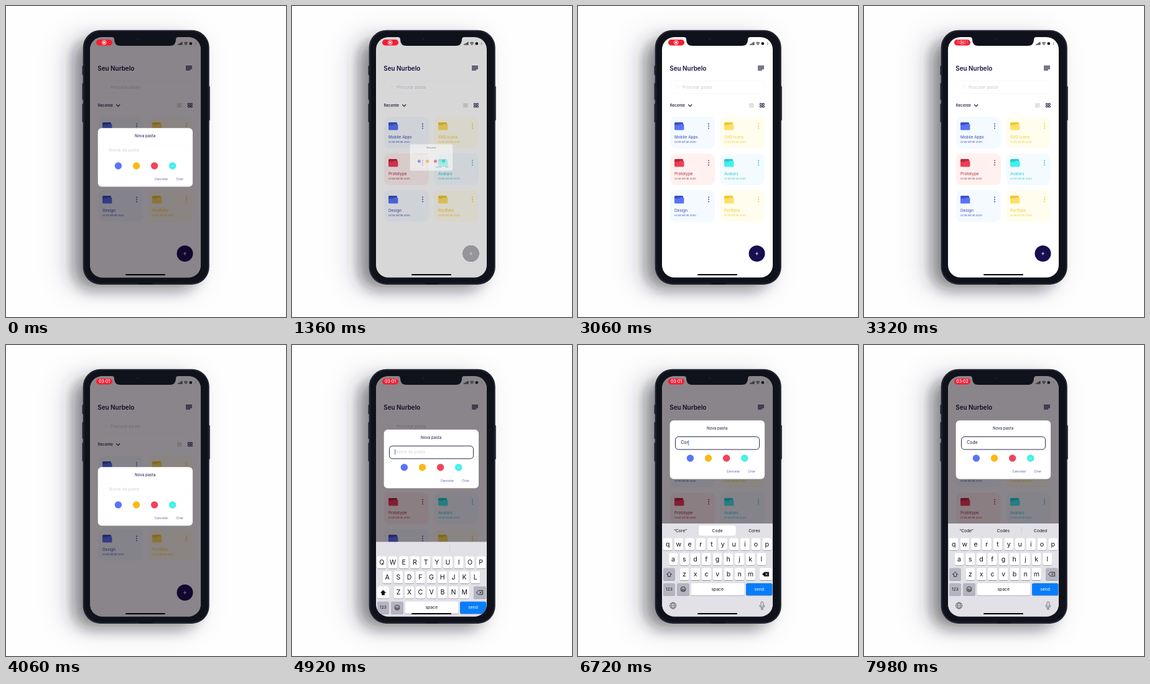
Recreate the animation shown at these times as an HTML page. Size 450 by 500 pixels, loop 8 s.

```html
<!DOCTYPE html>
<html lang="pt">
<head>
<meta charset="utf-8">
<title>Nova pasta</title>
<style>
  html, body { margin: 0; width: 100%; height: 100%; overflow: hidden; background: #fefefe; }
  svg { display: block; width: 100vw; height: 100vh; }
  text { font-family: Inter, "Open Sans", sans-serif; }
</style>
</head>
<body>
<svg id="stage" viewBox="0 0 450 500"></svg>
<script>
const LOOP = 8000, INK = '#14123f', KEY_GREY = '#b4b5c0';

// Markup helpers
const rect = (x, y, w, h, r, fill, more = '') =>
  `<rect x="${x}" y="${y}" width="${w}" height="${h}" rx="${r}" fill="${fill}" ${more}/>`;
const circle = (x, y, r, fill, more = '') => `<circle cx="${x}" cy="${y}" r="${r}" fill="${fill}" ${more}/>`;
const line = (d, color, width, more = '') =>
  `<path d="${d}" fill="none" stroke="${color}" stroke-width="${width}" stroke-linecap="round" stroke-linejoin="round" ${more}/>`;
const text = (x, y, size, fill, label, more = '') =>
  `<text x="${x}" y="${y}" font-size="${size}" fill="${fill}" ${more}>${label}</text>`;
const centered = (x, y, size, fill, label, more = '') =>
  text(x, y, size, fill, label, `text-anchor="middle" ${more}`);

const themes = {
  blue:   { card: '#f4faff', back: '#3f50bd', front: '#5873f8', title: '#3a48ad' },
  yellow: { card: '#fffdee', back: '#f3c62c', front: '#ffdf69', title: '#f5c81e' },
  red:    { card: '#fff1ef', back: '#b9283d', front: '#ee3c54', title: '#a32c40' },
  cyan:   { card: '#f3fbff', back: '#1fcfd0', front: '#40f0ec', title: '#2bc6d0' }
};

function card(name, theme, index) {
  const c = themes[theme];
  const dots = [11.5, 15, 18.5].map(y => circle(62, y, 0.95, c.title)).join('');
  return `<g transform="translate(${148 + index % 2 * 80} ${178 + Math.floor(index / 2) * 59})">
    ${rect(0, 0, 72, 51, 9, c.card)}
    <path d="M7 20V10.5q0-1.5 1.500-1.500h11q1.500 0 1.500 1.500V16z" fill="${c.back}"/>
    <path d="M7 13.500h7l2-1.500h5.200q1.200 0 1.200 1.200V20q0 1.500-1.500 1.500H8.500q-1.500 0-1.500-1.500z" fill="${c.front}"/>
    ${dots}
    ${text(7, 35.2, 6.4, c.title, name)}
    ${text(7, 42, 4, c.title, '03 de set de 2020')}
  </g>`;
}

function phoneBody() {
  return `<g filter="url(#wide)">${rect(92, 44, 222, 416, 34, '#33304a', 'opacity=".13"')}</g>
    <g filter="url(#near)">${rect(108, 54, 200, 402, 30, '#1b1b24', 'opacity=".45"')}</g>
    ${rect(122.6, 96, 3, 15, 1, '#171a24')}${rect(122.6, 124, 3, 27, 1, '#171a24')}
    ${rect(122.6, 157, 3, 30, 1, '#171a24')}${rect(324.5, 129, 3.200, 55, 1, '#171a24')}
    ${rect(123.700, 38.700, 203, 409.200, 28, '#20232e')}
    ${rect(126, 41, 198.500, 404.600, 26, '#0f121a')}
    ${rect(214, 445.800, 22, 1.500, .7, '#0a0d14')}`;
}

function appPage() {
  const menu = [10, 10, 10, 7].map((w, i) => rect(289, 96 + i * 2.1, w, 1.2, 0, INK)).join('');
  const list = [0, 1, 2].map(i => rect(275, 157 + i * 2.3, 7.5, 1, 0, '#b9bac6')).join('');
  const grid = [0, 1, 2, 3].map(i =>
    rect(292.4 + i % 2 * 4, 156.6 + (i >> 1) * 3.7, 2.9, 2.5, .4, 'none', `stroke="${INK}"`)).join('');
  const cards = [['Mobile Apps', 'blue'], ['SVG Icons', 'yellow'], ['Prototype', 'red'],
    ['Avatars', 'cyan'], ['Design', 'blue'], ['Portfolio', 'yellow']];
  return `${rect(135, 50, 178, 387, 0, '#fff')}
    ${text(147.3, 104, 9.9, INK, 'Seu Nurbelo', 'font-weight="600"')}${menu}
    ${rect(148, 120.5, 152, 20, 5, 'none', 'stroke="#f8f8fb" stroke-width=".8"')}
    ${circle(160, 130, 2.2, 'none', 'stroke="#efeff4" stroke-width=".8"')}
    ${text(168, 132.6, 6.75, '#c6c7d1', 'Procurar pasta')}
    ${text(147.8, 162.2, 6.2, INK, 'Recente', 'font-weight="500"')}
    ${line('M177.5 158.7l2.700 2.700 2.700-2.700', INK, 1.2)}${list}${grid}
    ${cards.map(([name, theme], i) => card(name, theme, i)).join('')}
    ${circle(287.5, 398, 13, '#160f50')}${circle(287.5, 398, 13, '#b1b1b5', 'id="fabPress"')}
    ${line('M285.4 398h4.200M287.500 395.900v4.200', '#fff', .8)}`;
}

function dialogBox() {
  const colors = ['#5a74f8', '#fdb813', '#f1435a', '#40f0ea'];
  return `<g id="dialog">
    ${rect(147.7, 196.3, 152.3, 94.2, 6, '#fff')}
    ${centered(223.6, 211.3, 6.2, INK, 'Nova pasta')}
    ${rect(156.5, 222.5, 135, 20.5, 5, '#fff', 'id="field" stroke-width=".9"')}
    ${text(165.5, 234.4, 6.75, '#d3d4dc', 'Nome da pasta', 'id="hint"')}
    ${text(165.3, 234.4, 6.9, INK, '', 'id="typed"')}
    ${rect(165, 228, .9, 8.5, .3, '#3b62ee', 'id="caret"')}
    ${colors.map((c, i) => circle(180.4 + i * 29.1, 257, 5.7, c)).join('')}
    ${line('M265.9 257.1l1.300 1.300 2.400-2.600', '#d4fffb', .7)}
    ${text(238.5, 280, 5.2, '#5a62a6', 'Cancelar')}${text(273.3, 280, 5.2, '#5a62a6', 'Criar')}
  </g>`;
}

function keyboard() {
  const STEP = 17.72;
  const key = (x, y, w, fill, more = '') =>
    rect(x, y + .8, w, 19.5, 2.6, '#97989f') + rect(x, y, w, 19.5, 2.6, fill, more);
  const row = (letters, firstX, y) => [...letters].map((letter, i) => {
    const x = firstX + i * STEP;
    return key(x - 7.5, y, 15, '#fff') + centered(x, y + 13.4, 10.6, '#111', letter, 'class="letter"');
  }).join('');
  return `<g id="keyboard">
    ${rect(135, 287, 178, 150, 0, '#e2e1e8')}
    ${rect(194, 290, 59.5, 16.5, 3.5, '#fff', 'id="pick"')}
    ${rect(253, 292, .6, 12, 0, '#c4c4cc', 'id="divider"')}
    ${[164.5, 224, 283.5].map(x => centered(x, 300.7, 6.7, '#111', '', 'class="word"')).join('')}
    ${row('qwertyuiop', 144.2, 310.4)}${row('asdfghjkl', 153.1, 334.4)}${row('zxcvbnm', 171, 358.6)}
    ${key(137, 358.6, 19, KEY_GREY, 'id="shift"')}
    <path id="arrow" d="M146.5 364.800l4 4h-2v3.600h-4v-3.600h-2z" stroke="#111" stroke-width=".8" stroke-linejoin="round"/>
    ${key(292, 358.6, 20, KEY_GREY, 'id="erase"')}
    <path id="eraseIcon" d="M296.5 368.500l3-3.200h7v6.400h-7z" stroke="#111" stroke-width=".8" stroke-linejoin="round"/>
    ${line('M301.5 367.100l2.800 2.800m0-2.800l-2.800 2.800', '#111', .8, 'id="eraseCross"')}
    ${key(137, 383, 19, KEY_GREY)}${centered(146.5, 395, 6.6, '#111', '123')}
    ${key(159, 383, 20, KEY_GREY)}${circle(169, 392.7, 4, 'none', 'stroke="#111" stroke-width=".8"')}
    ${circle(167.5, 391.6, .6, '#111')}${circle(170.5, 391.6, .6, '#111')}
    ${line('M166.6 393.900q2.400 2.700 4.800 0z', '#111', .7)}
    ${key(181.5, 383, 85.5, '#fff')}${centered(224.2, 394.9, 6.8, '#111', 'space')}
    ${key(270, 383, 42.3, '#087dfb')}${centered(291, 394.9, 6.8, '#fff', 'send')}
    ${circle(152.7, 419, 5, 'none', 'stroke="#55565d" stroke-width=".9"')}
    <ellipse cx="152.7" cy="419" rx="2.2" ry="5" fill="none" stroke="#55565d" stroke-width=".8"/>
    ${line('M148 419h9.400M149 416h7.400M149 422h7.400', '#55565d', .7)}
    ${rect(294, 412.8, 3.8, 8, 1.9, 'none', 'stroke="#55565d" stroke-width=".8"')}
    ${line('M292 418.500q0 4 3.900 4t3.900-4M295.900 422.500v2.300M294 424.800h3.800', '#55565d', .8)}
  </g>`;
}

function statusBar() {
  const bars = [1.5, 2.6, 3.8, 5].map((h, i) => rect(276 + i * 2, 62.8 - h, 1.3, h, .3, '#111')).join('');
  return `${rect(145, 54, 26, 9.4, 4.7, '#f51d33')}
    <g id="recording">${circle(157.7, 58.7, 3.3, 'none', 'stroke="#fff" stroke-width=".9"')}${circle(157.7, 58.7, 1.7, '#fff')}</g>
    ${centered(158, 61.2, 6.9, '#fff', '03:01', 'id="clock" font-weight="500"')}
    ${bars}${line('M286.3 59.300q2.800-2.400 5.600 0M287.500 60.900q1.600-1.300 3.200 0', '#111', 1)}${circle(289.1, 62.3, .7, '#111')}
    ${rect(294.6, 58.2, 4.4, 4.4, 1.5, '#111')}${line('M304.6 58.800q1 1.700 0 3.400', '#66656b', .8)}
    <path d="M170 49h107v1q-4 0-4 4 0 10-10 10h-79q-10 0-10-10 0-4-4-4z" fill="#0f121a"/>
    ${circle(211.5, 53.5, 1.3, '#1d2333')}
    ${rect(192, 431, 64, 2, 1, '#000')}`;
}

const stage = document.getElementById('stage');
stage.innerHTML = `<defs>
    <filter id="near" x="-50%" y="-50%" width="200%" height="200%"><feGaussianBlur stdDeviation="11"/></filter>
    <filter id="wide" x="-50%" y="-50%" width="200%" height="200%"><feGaussianBlur stdDeviation="20"/></filter>
    <clipPath id="screen">${rect(135, 50, 178, 386.5, 20, '#fff')}</clipPath>
  </defs>
  ${phoneBody()}
  <g clip-path="url(#screen)">
    ${appPage()}
    ${rect(135, 50, 178, 387, 0, '#0c020c', 'id="shade"')}
    ${dialogBox()}${keyboard()}${statusBar()}
  </g>`;

const el = {};
stage.querySelectorAll('[id]').forEach(node => el[node.id] = node);
const letters = [...stage.querySelectorAll('.letter')];
const words = [...stage.querySelectorAll('.word')];

// Timeline, all in milliseconds
const OPENINGS = [1256, 3660], CLOSINGS = [160, 2560], FADE = 320, FOCUS = 4700;
const typing = [[FOCUS, ''], [5500, 'C'], [5800, 'Co'], [6080, 'Cor'], [6350, 'Core'],
  [6700, 'Cor'], [6880, 'Co'], [7160, 'Cod'], [7420, 'Code']];
const suggestions = [[0, ['', '', '']], [6400, ['“Core”', 'Code', 'Cores']], [7520, ['“Code”', 'Codes', 'Coded']]];

const progress = (t, from, length) => Math.min(1, Math.max(0, (t - from) / length));
const linear = x => x;
const easeInOut = x => x < .5 ? 2 * x * x : 1 - 2 * (1 - x) ** 2;
const easeOut = x => 1 - (1 - x) ** 3;
const sum = (times, f) => times.reduce((total, time) => total + f(time), 0);
const latest = (steps, t) => steps.filter(([time]) => time <= t).pop();
const set = (node, attributes) => {
  for (const name in attributes) node.setAttribute(name, attributes[name]);
};

// 1 while the dialog is open, 0 while it is closed
function openness(t, ease) {
  const moved = time => ease(progress(t, time, FADE));
  return 1 + sum(OPENINGS, moved) - sum(CLOSINGS, moved);
}

function render(t) {
  const open = openness(t, easeInOut);
  const pressed = sum(OPENINGS, s => progress(t, s - 60, 100) - progress(t, s + 120, 200));
  const lift = easeOut(progress(t, 4754, 400));
  const scale = .3 + .7 * open;

  set(el.shade, { opacity: .48 * openness(t, linear) });
  set(el.fabPress, { opacity: pressed });
  set(el.dialog, {
    opacity: Math.min(1, open * 2.6),
    transform: `translate(224 ${243.5 - 75 * lift}) scale(${scale}) translate(-224 -243.5)`
  });
  set(el.keyboard, { transform: `translate(0 ${149 * (1 - lift)})`, opacity: lift > 0 ? 1 : 0 });

  const focused = t >= FOCUS;
  const [since, value] = latest(typing, t) || [0, ''];
  el.typed.textContent = value;
  set(el.field, { stroke: focused ? INK : '#fbfbfd' });
  set(el.hint, { opacity: value ? 0 : 1 });
  set(el.caret, {
    x: 165.2 + (value ? el.typed.getComputedTextLength() + .3 : 0),
    opacity: focused && (t - since) % 1000 < 500 ? 1 : 0
  });

  const caps = !value;
  letters.forEach(node => {
    node.textContent = caps ? node.textContent.toUpperCase() : node.textContent.toLowerCase();
  });
  set(el.shift, { fill: caps ? '#fff' : KEY_GREY });
  set(el.arrow, { fill: caps ? '#111' : 'none' });
  const erasing = t >= 6660 && t < 6960;
  set(el.erase, { fill: erasing ? '#fff' : KEY_GREY });
  set(el.eraseIcon, { fill: erasing ? '#111' : 'none' });
  set(el.eraseCross, { stroke: erasing ? '#fff' : '#111' });

  const options = latest(suggestions, t)[1];
  words.forEach((node, i) => node.textContent = options[i]);
  const picked = options[1] === 'Code';
  set(el.pick, { opacity: picked ? 1 : 0 });
  set(el.divider, { opacity: picked ? 0 : 1 });

  const clockShown = progress(t, 3220, 200);
  set(el.recording, { opacity: 1 - clockShown });
  set(el.clock, { opacity: clockShown });
  el.clock.textContent = t < 7500 ? '03:01' : '03:02';
}

const start = performance.now();
function frame() {
  render((performance.now() - start) % LOOP);
  requestAnimationFrame(frame);
}
frame();
</script>
</body>
</html>
```
